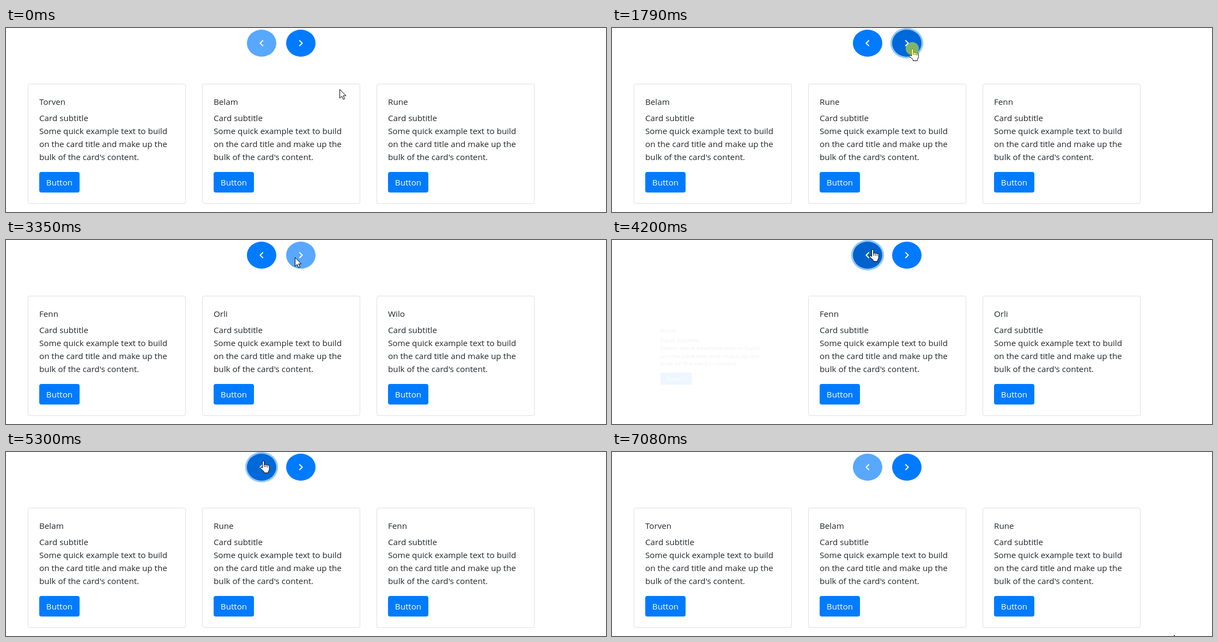
Animation, 1101 px wide and 340 px high, one loop 7.15 s. Source, as an HTML page:

```html
<!DOCTYPE html>
<html lang="en">
<head>
<meta charset="utf-8">
<title>Card carousel</title>
<style>
html, body { margin: 0; width: 100%; height: 100%; overflow: hidden; background: #fff; }
body { position: relative; font: 15.2px/24px "Open Sans", "Noto Sans", sans-serif; color: #212529; }
body > *, .card > * { position: absolute; box-sizing: border-box; }
.nav { top: 3px; width: 54px; height: 50px; border-radius: 50%; }
.nav svg { position: absolute; left: 15px; top: 13px; fill: #fff; }
.card { top: 103px; width: 290px; height: 222px; border: 1px solid rgba(0,0,0,.125); border-radius: 4px; }
.card > * { left: 20px; white-space: nowrap; }
.title { top: 20px; }
.text { top: 50px; }
.button { top: 162px; width: 74px; height: 38px; border-radius: 4px; background: #007bff; color: #fff; text-align: center; line-height: 38px; }
#pointer { left: 0; top: 0; overflow: visible; fill: #fff; stroke: #000; stroke-linejoin: round; }
#press { width: 24px; height: 24px; border-radius: 50%; background: rgba(255,255,0,.5); }
</style>
</head>
<body>
<div class="nav" style="left:442px"><svg width="24" height="24"><path d="M15.41 7.41 14 6l-6 6 6 6 1.41-1.41L10.83 12z"/></svg></div>
<div class="nav" style="left:514px"><svg width="24" height="24"><path d="M10 6 8.59 7.41 13.17 12l-4.58 4.59L10 18l6-6z"/></svg></div>
<svg id="pointer" width="20" height="26">
  <path id="arrow" d="M.5 .5v16.2l3.8-3.6 2.6 5.9 2.6-1.1-2.6-5.8h5z"/>
  <path id="hand" transform="translate(-6)" d="M4.5 13.5V2q0-1.5 1.7-1.5T7.9 2v6q0-1 1.6-1t1.6 1.2q.2-.8 1.6-.7t1.6 1.3q.2-.6 1.5-.5t1.5 1.5v5q0 3-2 5.5v2.2H7.5v-2.2L1 14.5q-.8-1.5.3-2.2t3.2 1.2zM7.9 8v4M11.1 8.5v3.5M14.3 9.5v3"/>
</svg>
<div id="press"></div>
<script>
const LOOP = 7150, STEP = LOOP / 92, FADE = 150, ENTER = 260;
const names = ['Torven', 'Belam', 'Rune', 'Fenn', 'Orli', 'Wilo'];

// [mouse down, mouse up, direction]
const clicks = [
  [1085, 1285, 1], [1785, 1940, 1], [2485, 2716, 1],
  [3960, 4180, -1], [4815, 4890, -1], [5360, 5500, -1]
];

// [time, x, y] of the pointer tip
const path = [
  [75, 612, 113], [620, 551, 38], [3175, 551, 38], [3640, 478, 17], [4815, 478, 17],
  [5130, 472, 16], [6200, 471, 15], [6905, 1016, 346], [6990, 1018, 335], [7070, 1031, 338]
];

const shades = [[0, 123, 255], [0, 105, 217], [0, 98, 204]]; // idle, hover, active
const $ = id => document.getElementById(id);
const clamp = v => Math.max(0, Math.min(1, v));
const lerp = (a, b, p) => a + (b - a) * p;

const cards = [0, 1, 2].map(slot => {
  const card = document.createElement('div');
  card.className = 'card';
  card.style.left = 40 + 320 * slot + 'px';
  card.innerHTML = `<div class="title"></div>
    <div class="text">Card subtitle<br>Some quick example text to build<br>on the card title and make up the<br>bulk of the card's content.</div>
    <div class="button">Button</div>`;
  document.body.insertBefore(card, $('pointer'));
  return card;
});

function makeNav(element, direction, hoverStart) {
  const own = clicks.filter(c => c[2] === direction);
  const focus = own[0][0], end = own[own.length - 1][1];
  const marks = [[0, 0], [hoverStart, 1]];
  for (const [down, up] of own) marks.push([down, 2], [up, up === end ? 0 : 1]);
  return {
    hovered: t => t >= hoverStart && t < end,
    draw(t, disabled) {
      const i = marks.filter(m => m[0] <= t).length - 1;
      const from = shades[marks[Math.max(0, i - 1)][1]], to = shades[marks[i][1]];
      const p = clamp((t - marks[i][0]) / FADE);
      const ring = .5 * clamp((t - focus) / FADE) * (1 - clamp((t - end) / FADE));
      element.style.background = `rgb(${from.map((v, k) => Math.round(lerp(v, to[k], p)))})`;
      element.style.boxShadow = `0 0 0 3.2px rgba(38,143,255,${ring})`;
      element.style.opacity = disabled ? .65 : 1;
    }
  };
}

const [prevElement, nextElement] = document.querySelectorAll('.nav');
const prev = makeNav(prevElement, -1, 3560), next = makeNav(nextElement, 1, 540);

function drawCards(t) {
  const done = clicks.filter(c => c[1] <= t);
  const first = done.reduce((sum, c) => sum + c[2], 0);
  const [, start, direction] = done[done.length - 1] || [0, -ENTER, 1];
  const entering = direction > 0 ? 2 : 0;
  const [sx, sy] = direction > 0 ? [.9, .85] : [.76, .57];
  cards.forEach((card, slot) => {
    const p = slot === entering ? clamp((t - start) / ENTER) : 1;
    card.firstChild.textContent = names[first + slot];
    card.style.opacity = p;
    card.style.transform = p < 1 ? `scale(${lerp(sx, 1, p)},${lerp(sy, 1, p)})` : 'none';
  });
  return first;
}

function drawPointer(t) {
  const i = path.findIndex(k => k[0] > t);
  const b = i < 0 ? path[path.length - 1] : path[i], a = i > 0 ? path[i - 1] : b;
  const p = a === b ? 1 : (t - a[0]) / (b[0] - a[0]), eased = p * p * (3 - 2 * p);
  const x = Math.round(lerp(a[1], b[1], eased)), y = Math.round(lerp(a[2], b[2], eased));
  const hand = prev.hovered(t) || next.hovered(t);
  $('pointer').style.transform = `translate(${x}px,${y}px)`;
  $('hand').style.display = hand ? '' : 'none';
  $('arrow').style.display = hand ? 'none' : '';
  $('press').style.transform = `translate(${x - 12}px,${y - 12}px)`;
  $('press').style.display = clicks.some(c => t >= c[0] && t < c[1]) ? '' : 'none';
}

function draw(now) {
  const t = Math.floor((now % LOOP + 8) / STEP) * STEP;
  const first = drawCards(t);
  prev.draw(t, first === 0);
  next.draw(t, first === names.length - 3);
  drawPointer(t);
}

const begin = performance.now();
(function tick() {
  draw(performance.now() - begin);
  requestAnimationFrame(tick);
})();
</script>
</body>
</html>
```
